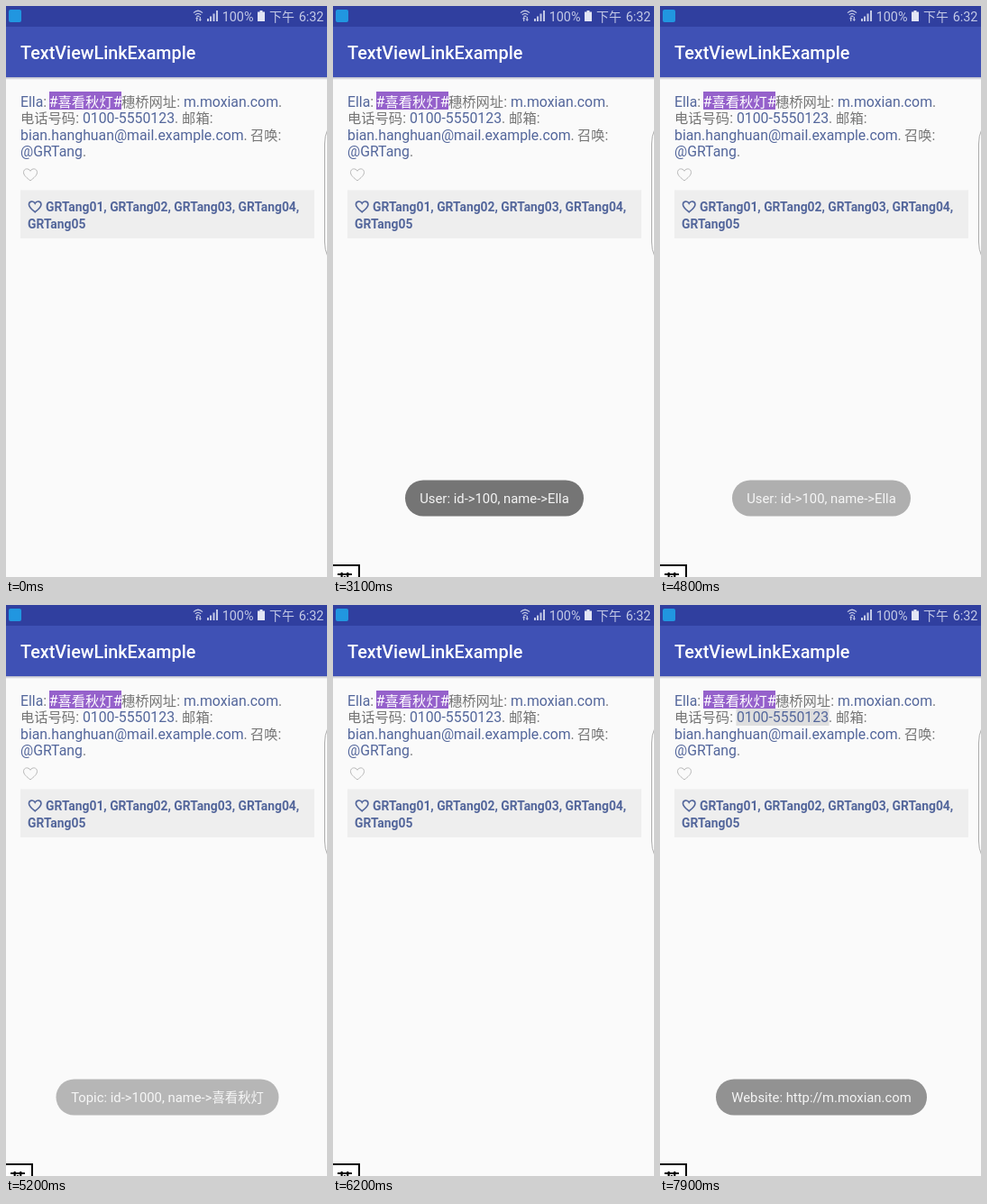
An HTML page for the animation above (8000 ms loop, 356 px wide and 634 px high).

```html
<!DOCTYPE html>
<html lang="zh-CN">
<head>
<meta charset="utf-8">
<title>TextViewLinkExample</title>
<style>
  html, body { margin: 0; width: 100%; height: 100%; overflow: hidden; background: #fafafa; }
  svg { display: block; width: 356px; height: 634px; }
  text { font-family: Roboto, "Noto Sans CJK SC", "Noto Sans CJK", sans-serif; }
  .status { font-size: 14.4px; fill: #c3c9e6; }
  .title { font-size: 19.78px; font-weight: 500; fill: #fff; }
  .body { font-size: 15.82px; fill: #757575; }
  .han { font-size: .967em; }
  .link { fill: #53669b; }
  .likes { font-size: 13.85px; font-weight: 700; fill: #53669b; }
  .toast rect { fill: #757575; }
  .toast text { font-size: 14.83px; fill: #f4f4f4; text-anchor: middle; }
  .ime text { font-size: 18px; font-weight: 700; fill: #000; }
</style>
</head>
<body>
<svg viewBox="0 0 356 634">
  <defs>
    <linearGradient id="shade" x2="0" y2="1">
      <stop offset="0" stop-color="#b4b7c6"/>
      <stop offset="1" stop-color="#fafafa"/>
    </linearGradient>
    <path id="heart" d="M0 6.5C-4 3.2-7.5 .6-7.5-2.8C-7.5-7.2-2-8 0-4.2C2-8 7.5-7.2 7.5-2.8C7.5 .6 4 3.2 0 6.5Z" fill="none"/>
  </defs>
  <rect width="356" height="634" fill="#fafafa"/>
  <rect y="79" width="356" height="3" fill="url(#shade)"/>
  <rect y="22" width="356" height="57" fill="#3f51b5"/>
  <rect width="356" height="23" fill="#303f9f"/>

  <!-- status bar -->
  <rect x="3" y="4" width="14" height="14" rx="2" fill="#2196e0"/>
  <g fill="none" stroke="#c3c9e6" stroke-width="1.3">
    <path d="M208 7.6Q213 2.8 218 7.6M209.8 9.9Q213 6.8 216.2 9.9"/>
    <path d="M211.6 11.8Q213 10.6 214.4 11.8"/>
  </g>
  <path id="arrows" d="M210 14.2L211.7 12L213.4 14.2H212.3V17H211.1V14.2ZM213.6 14.8L215.3 17L217 14.8H215.9V12H214.7V14.8Z" fill="#c3c9e6"/>
  <path d="M223 14h2v3h-2zM226 11.5h2v5.5h-2zM229.5 8.5h2v8.5h-2zM233 5h2v12h-2z" fill="#c3c9e6"/>
  <path d="M281.5 5h3v1.5h2.5V17h-8V6.5h2.5z" fill="#e2e5f4"/>
  <text class="status" x="239.7" y="16.6">100%</text>
  <text class="status" x="292" y="16.6"><tspan class="han">下午</tspan></text>
  <text class="status" x="324.7" y="16.6">6:32</text>
  <text class="title" x="16" y="58.6">TextViewLinkExample</text>

  <!-- post -->
  <rect id="urlPress" x="197" y="95" width="106" height="20" fill="#dedede"/>
  <rect id="phonePress" x="84.5" y="115" width="103" height="19" fill="#dedede"/>
  <rect x="48" y="95" width="80" height="20" fill="#9561cb"/>
  <g class="body">
    <text x="16" y="111.5"><tspan class="link">Ella</tspan>:</text>
    <text x="47.8" y="111.5" fill="#fff">#<tspan class="han">喜看秋灯</tspan>#</text>
    <text x="128" y="111.5"><tspan class="han">穗桥网址</tspan>: <tspan class="link">m.moxian.com</tspan>.</text>
    <text x="16" y="130"><tspan class="han">电话号码</tspan>: <tspan class="link">0100-5550123</tspan>. <tspan class="han">邮箱</tspan>:</text>
    <text x="16" y="148.7"><tspan class="link">bian.hanghuan@mail.example.com</tspan>. <tspan class="han" x="271">召唤</tspan>:</text>
    <text x="16" y="167.3"><tspan class="link">@GRTang</tspan>.</text>
  </g>
  <use href="#heart" x="27" y="187.5" stroke="#b8b8b8"/>
  <rect x="16" y="204.5" width="326" height="53.5" fill="#eee"/>
  <use href="#heart" transform="translate(32.2 223) scale(.9)" stroke="#53669b" stroke-width="1.8"/>
  <text class="likes" x="44" y="228.3">GRTang01, GRTang02, GRTang03, GRTang04,</text>
  <text class="likes" x="24" y="246.7">GRTang05</text>
  <path d="M356.5 138Q353.5 144 353.5 153V262Q353.5 271 356.5 277" fill="#fff" stroke="#aaa"/>

  <g id="toasts"></g>
  <g id="ime" class="ime">
    <rect x="-3" y="621" width="32" height="20" fill="#fff" stroke="#000" stroke-width="2"/>
    <text x="4" y="644.5">英</text>
  </g>
</svg>
<script>
const LOOP = 8000, STEP = 100;
const $ = id => document.getElementById(id);

function toast(id, x, width, label) {
  $('toasts').insertAdjacentHTML('beforeend',
    `<g id="${id}" class="toast"><rect x="${x}" y="526.5" width="${width}" height="40" rx="20"/>` +
    `<text x="${x + width / 2}" y="552.3">${label}</text></g>`);
}
toast('user', 80, 198, 'User: id-&gt;100, name-&gt;Ella');
toast('topic', 55.5, 247, 'Topic: id-&gt;1000, name-&gt;<tspan class="han">喜看秋灯</tspan>');
toast('site', 62, 234, 'Website: http://m.moxian.com');

// Each run: start time, then one opacity per 100 ms; the last value holds.
const IN = [.25, .5, .78, 1], OUT = [.78, .56, .3, .08, 0];
const tracks = {
  user: [[2800, ...IN], [4700, ...OUT]],
  topic: [[5100, ...IN], [5900, .7, .35, .08, 0]],
  site: [[6300, ...IN], [7900, ...OUT]],
  ime: [[1700, ...IN], [4300, 0], [4500, ...IN], [5400, 0], [5600, ...IN], [7300, 0], [7500, ...IN]],
  urlPress: [[5700, 1], [6100, 0]],
  phonePress: [[7800, 1]],
  arrows: [[0, 1], [800, 0], [1800, 1], [4400, 0], [4600, 1], [5500, 0], [5700, 1], [7600, 0], [7700, 1]]
};

function valueAt(runs, time) {
  let value = 0;
  for (const [start, ...values] of runs) {
    if (time < start) break;
    value = values[Math.min(values.length - 1, Math.floor((time - start) / STEP))];
  }
  return value;
}

const begin = performance.now();
function draw(now) {
  const time = Math.max(0, now - begin) % LOOP;
  for (const id in tracks) $(id).setAttribute('opacity', valueAt(tracks[id], time));
  requestAnimationFrame(draw);
}
draw(begin);
</script>
</body>
</html>
```
